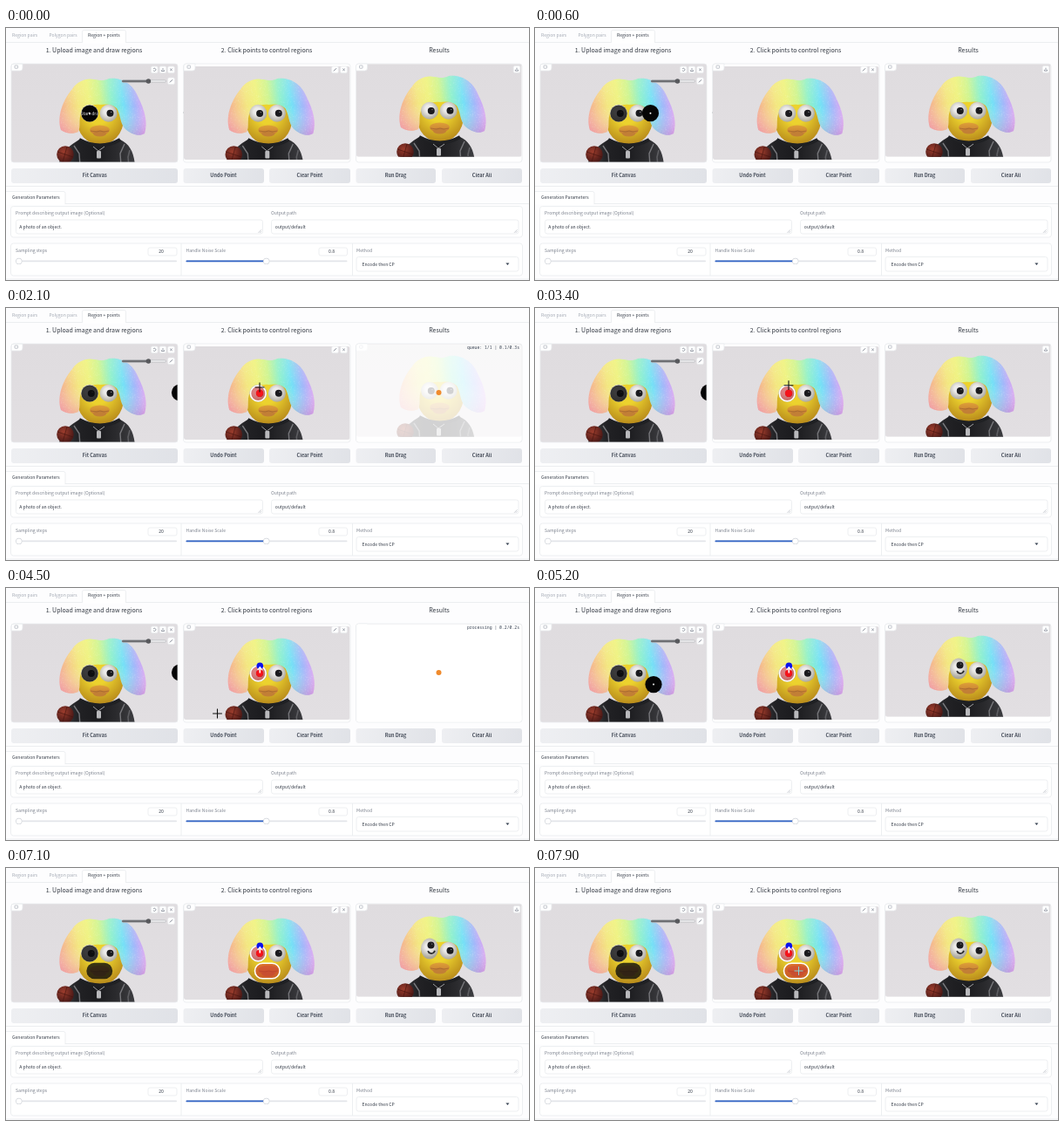
An HTML page with a canvas for the animation above (8 s loop, 600 by 289 pixels).

```html
<!DOCTYPE html>
<html lang="en">
<head>
<meta charset="utf-8">
<title>Region drag demo</title>
<style>
  html, body { margin: 0; width: 100%; height: 100%; overflow: hidden; background: #fdfdfe; }
  canvas, svg { position: absolute; left: 0; top: 0; width: 600px; height: 289px; }
  svg { font: 5.1px "Noto Sans CJK SC", "Noto Sans CJK JP", "Noto Sans", sans-serif; fill: #7b818d; }
  .head { font-size: 7px; fill: #30363f; text-anchor: middle; }
  .btn { font-size: 5.5px; font-weight: 700; fill: #454c59; text-anchor: middle; }
  .val { fill: #333a46; }
  .num { fill: #333a46; text-anchor: middle; }
  .off { fill: #a3a9b4; }
  #status { font: 4.78px "Noto Sans Mono", "Liberation Mono", monospace; fill: #374151; text-anchor: end; }
</style>
</head>
<body>
<canvas id="stage"></canvas>
<svg viewBox="0 0 600 289">
  <g class="off"><text x="7" y="10.4">Region pairs</text><text x="49.5" y="10.4">Polygon pairs</text></g>
  <text class="val" x="94" y="10.4">Region + points</text>
  <g class="head">
    <text x="101" y="28">1. Upload image and draw regions</text>
    <text x="299" y="28">2. Click points to control regions</text>
    <text x="497" y="28">Results</text>
  </g>
  <g class="btn">
    <text x="101.7" y="171">Fit Canvas</text>
    <text x="249.5" y="171">Undo Point</text>
    <text x="348.5" y="171">Clear Point</text>
    <text x="447" y="171">Run Drag</text>
    <text x="546" y="171">Clear All</text>
  </g>
  <text class="val" x="7" y="196.1">Generation Parameters</text>
  <text x="11" y="214.1">Prompt describing output image (Optional)</text>
  <text x="304" y="214.1">Output path</text>
  <text class="val" x="15.3" y="229.9">A photo of an object.</text>
  <text class="val" x="308.8" y="229.9">output/default</text>
  <text x="11" y="257.4">Sampling steps</text>
  <text x="206.5" y="257.4">Handle Noise Scale</text>
  <text x="402" y="257.4">Method</text>
  <text class="num" x="178" y="258.2">20</text>
  <text class="num" x="373.5" y="258.2">0.8</text>
  <text class="val" x="408.5" y="272.6">Encode then CP</text>
  <text id="status" x="589" y="47"></text>
</svg>
<script>
const LOOP = 8000, STEP = 100;
const canvas = document.getElementById('stage');
const statusText = document.getElementById('status');
const c = canvas.getContext('2d');
const dpr = window.devicePixelRatio || 1;
canvas.width = 600 * dpr;
canvas.height = 289 * dpr;

const LINE = '#e9ebee', BRUSH = 9.6;
// Shift of the toy picture in panels two and three
const DX2 = 193.3, DX3 = 390, DY3 = -3;

function box(x, y, w, h, r, fill, stroke) {
  c.beginPath();
  c.roundRect(x, y, w, h, r);
  if (fill) { c.fillStyle = fill; c.fill(); }
  if (stroke) { c.strokeStyle = stroke; c.lineWidth = 0.8; c.stroke(); }
}
function oval(x, y, rx, ry, fill) {
  c.beginPath();
  c.ellipse(x, y, rx, ry, 0, 0, 7);
  c.fillStyle = fill;
  c.fill();
}
const dot = (x, y, r, fill) => oval(x, y, r, r, fill);
function line(color, width, ...p) {
  c.beginPath();
  c.moveTo(p[0], p[1]);
  for (let i = 2; i < p.length; i += 2) c.lineTo(p[i], p[i + 1]);
  c.strokeStyle = color;
  c.lineWidth = width;
  c.stroke();
}
function blend(x0, y0, x1, y1, ...colors) {
  const g = c.createLinearGradient(x0, y0, x1, y1);
  colors.forEach((k, i) => g.addColorStop(i / (colors.length - 1), k));
  return g;
}
function glow(x, y, r, r0, a, b) {
  const g = c.createRadialGradient(x, y, r0, x, y, r);
  g.addColorStop(0, a);
  g.addColorStop(1, b);
  return g;
}
// Eased position along [time, x, y] keys
function follow(t, keys) {
  if (t <= keys[0][0]) return keys[0].slice(1);
  for (let i = 1; i < keys.length; i++) {
    const a = keys[i - 1], b = keys[i];
    if (t < b[0]) {
      let k = (t - a[0]) / (b[0] - a[0]);
      k = k * k * (3 - 2 * k);
      return [a[1] + (b[1] - a[1]) * k, a[2] + (b[2] - a[2]) * k];
    }
  }
  return keys[keys.length - 1].slice(1);
}

const hair = new Path2D('M63 117C58 100 66 82 76 70C82 61 92 57 101 59C108 60 112 61 118 58' +
  'C134 56 147 66 152 80C159 94 163 108 159 121C153 125 143 122 136 115' +
  'C131 109 131 98 127 92C121 87 114 87 108 88C99 87 90 90 86 98C83 106 86 112 83 119C77 122 68 121 63 117Z');
const jacket = new Path2D('M60 158C63 142 74 134 84 128C95 137 120 137 131 128C142 133 147 143 148 158Z');

const curls = new Path2D();
let seed = 7;
const rand = () => (seed = seed * 16807 % 2147483647) / 2147483647;
for (let i = 0; i < 900; i++) {
  const x = 58 + rand() * 104, y = 56 + rand() * 68;
  curls.moveTo(x, y);
  curls.arc(x, y, 0.45, 0, 7);
}

function eye(x, y, ry = 10) {
  oval(x, y, 10, ry, glow(x - 1, y - 2, 12.5, 4, '#ecebea', '#a9a599'));
}
function pupil(x, y) {
  dot(x, y, 4, '#1b1b1e');
  dot(x + 1.2, y - 1.4, 0.7, '#8a8a8e');
}

function toy(edited) {
  c.fillStyle = blend(60, 0, 148, 0, '#47474a', '#222225', '#1b1b1e', '#2a2a2d', '#3d3d41');
  c.fill(jacket);
  line('#77777b', 1.4, 78, 135, 84, 144, 85, 158);
  line('#77777b', 1.4, 136, 133, 131, 144, 132, 158);
  line('#5d5d61', 1.6, 142, 140, 140, 148, 141, 158);
  dot(68, 145, 9.8, glow(66, 142, 12, 1, '#963a2b', '#4d1a17'));
  line('#42130f', 0.6, 59, 142, 77, 148);
  line('#42130f', 0.6, 70, 136, 65, 154);
  oval(108, 104, 27, 30, glow(106, 98, 37, 12, '#ecd22e', '#b5861a'));
  c.beginPath();
  c.moveTo(84, 128);
  c.quadraticCurveTo(108, 141, 131, 128);
  c.strokeStyle = '#1f2023';
  c.lineWidth = 4;
  c.stroke();
  line('#bdbdbf', 0.8, 100, 136, 106, 141, 113, 136);
  box(104, 141, 5, 8.5, 1, '#b9b9bc');

  oval(107.5, 117, 11.5, 5.5, blend(0, 111, 0, 123, '#dfa238', '#c47a33'));
  oval(107.5, 121, 7.5, 3.6, '#c27f36');
  line('#a0622e', 0.7, 97, 118, 104, 119, 108, 118, 112, 119, 118, 118);

  c.fillStyle = blend(61, 108, 161, 92, '#f2a596', '#f5c98a', '#f3e780', '#eef27c', '#cdf48c', '#8cf0cb', '#74e0f6', '#a4b7fa', '#e6a5f0');
  c.fill(hair);
  c.save();
  c.clip(hair);
  c.fillStyle = blend(0, 56, 0, 124, 'rgba(255,250,190,.2)', 'rgba(255,255,255,0)', 'rgba(232,110,180,.4)');
  c.fillRect(56, 54, 110, 74);
  c.fillStyle = 'rgba(255,255,255,.22)';
  c.fill(curls);
  c.restore();

  eye(117.6, 97.8);
  pupil(119.5, 97.8);
  if (edited) {
    eye(96, 95.5, 12);
    pupil(97.5, 91.5);
    c.beginPath();
    c.arc(98, 97, 4, 0.2, 2.9);
    c.strokeStyle = '#2a2a2c';
    c.lineWidth = 1.8;
    c.stroke();
  } else {
    eye(96, 97.8);
    pupil(97.8, 98);
  }
}

function photo(x, y, w, h, dx, dy, edited) {
  c.save();
  c.beginPath();
  c.roundRect(x, y, w, h, 2.5);
  c.clip();
  c.fillStyle = blend(x, y, x, y + h, '#dfdcdf', '#e2dfe2');
  c.fillRect(x, y, w, h);
  c.translate(dx, dy);
  toy(edited);
  c.restore();
}

function badge(x) {
  box(x, 41, 13, 8, [3, 0, 3, 0], '#fff', LINE);
  box(x + 4, 43, 3.6, 3.2, 0.5, null, '#b3b8c1');
}
function tool(x, y, kind) {
  box(x - 3.8, y - 3.8, 7.6, 7.6, 1.5, '#fff', LINE);
  const k = '#717987';
  if (kind === 'x') {
    line(k, 0.7, x - 1.3, y - 1.3, x + 1.3, y + 1.3);
    line(k, 0.7, x + 1.3, y - 1.3, x - 1.3, y + 1.3);
  } else if (kind === 'down') {
    line(k, 0.7, x, y - 1.8, x, y + 0.8);
    line(k, 0.7, x - 1.6, y + 0.4, x - 1.6, y + 1.7, x + 1.6, y + 1.7, x + 1.6, y + 0.4);
  } else if (kind === 'undo') {
    c.beginPath();
    c.arc(x, y, 1.6, -2.4, 2.6);
    c.strokeStyle = k;
    c.lineWidth = 0.7;
    c.stroke();
  } else {
    line(k, 0.9, x - 1.6, y + 1.6, x + 1.6, y - 1.6);
  }
}

function slider(x, w, y, at, full) {
  box(x, y - 0.8, w, 1.6, 0.8, '#e3e5e9');
  if (full) box(x, y - 0.9, at - x, 1.8, 0.9, '#2f62c4');
  dot(at, y, 3.6, '#cfd2d8');
  dot(at, y, 3, '#fff');
}
function grip(x, y) {
  line('#a8aeb8', 0.6, x - 3.5, y, x, y - 3.5);
  line('#a8aeb8', 0.6, x - 1.6, y, x, y - 1.6);
}

function layout() {
  c.fillStyle = '#fdfdfe';
  c.fillRect(0, 0, 600, 289);
  box(-2, 16.5, 603, 165, 2, '#fdfdfe', LINE);
  box(87.5, 2.5, 50, 14, [2, 2, 0, 0], '#fff', LINE);
  line('#fff', 1.2, 88, 16.6, 137, 16.6);
  box(-2, 201.5, 603, 86.5, 2, '#fdfdfe', LINE);
  box(-2, 187.5, 70, 14, [2, 2, 0, 0], '#fff', LINE);
  line('#fff', 1.2, 0, 201.6, 67.5, 201.6);

  for (const [x, w] of [[6, 191], [203.5, 92.5], [302, 93], [401.5, 91.5], [500, 92]])
    box(x, 161, w, 17, 3, blend(x, 161, x + w, 178, '#eeeff2', '#e0e2e7'));

  box(5.5, 204.5, 587, 35.5, 3, '#fff', LINE);
  box(11.5, 220, 283, 16, 2.5, '#fff', LINE);
  box(304.5, 220, 283.5, 16, 2.5, '#fff', LINE);
  grip(293, 234.8);
  grip(586.5, 234.8);

  box(5.5, 247, 587, 37, 3, '#fff', LINE);
  line(LINE, 0.8, 201, 247, 201, 284);
  line(LINE, 0.8, 397.5, 247, 397.5, 284);
  box(163, 252, 33, 9, 2, '#fff', LINE);
  box(359, 252, 32.5, 9, 2, '#fff', LINE);
  slider(11, 185, 267.4, 14.8, false);
  slider(206.5, 185, 267.4, 298.7, true);
  box(402, 262.5, 186, 16.5, 2.5, '#fff', LINE);
  c.beginPath();
  c.moveTo(573.4, 269.6);
  c.lineTo(577.4, 269.6);
  c.lineTo(575.4, 272);
  c.fillStyle = '#374151';
  c.fill();
}

function capsule(x0, x1, y, r) {
  c.beginPath();
  c.roundRect(x0 - r, y - r, x1 - x0 + 2 * r, 2 * r, r);
}

function drawPanel(t) {
  photo(6, 41, 191, 113, 0, 0, false);
  c.save();
  c.beginPath();
  c.roundRect(6, 41, 191, 113, 2.5);
  c.clip();
  c.fillStyle = 'rgba(10,10,12,.78)';
  if (t >= 200) { capsule(96, 96, 98, BRUSH); c.fill(); }
  const [x, y] = follow(t, [[400, 96, 98], [900, 199.5, 97], [4900, 199.5, 97], [5400, 101.5, 118],
    [5800, 101.5, 118], [6200, 109, 118], [6500, 113, 118], [6800, 113, 118], [7100, 212, 116]]);
  if (t >= 5500) { capsule(101.5, t < 6600 ? x : 113, 118, 9.2); c.fill(); }
  dot(x, y, BRUSH, '#050506');
  if (t < 200) {
    c.save();
    c.clip();
    c.font = '5.1px "Noto Sans CJK SC","Noto Sans CJK JP",sans-serif';
    c.textAlign = 'center';
    c.fillStyle = '#e8e8e8';
    c.fillText('Start drawing', 101.5, 99.6);
    c.restore();
  }
  if (x < 190) dot(x, y, 1, '#fff');
  c.restore();

  badge(6);
  tool(170.3, 47.8, 'undo');
  tool(180, 47.8, 'down');
  tool(189.5, 47.8, 'x');
  box(133, 59.8, 50.5, 2.4, 1.2, '#f2f2f3', '#bcbdc1');
  box(133, 59.8, 30, 2.4, 1.2, '#6e6f73');
  dot(163.4, 61, 2.8, '#58595d');
  tool(189.5, 60.8, 'pen');
  box(6, 41, 191, 113, 3, null, LINE);
}

function region(x0, x1, y) {
  capsule(x0, x1, y, 8.8);
  c.fillStyle = 'rgba(205,40,45,.55)';
  c.fill();
  c.strokeStyle = '#fff';
  c.lineWidth = 1.6;
  c.stroke();
}
function cross(x, y, color, r, w) {
  line(color, w, x - r, y, x + r, y);
  line(color, w, x, y - r, x, y + r);
}

function pointPanel(t) {
  box(203.5, 41, 191.5, 113, 3, '#fff', LINE);
  photo(204, 44, 190.5, 107, DX2, 0, false);
  if (t >= 700) region(96 + DX2, 96 + DX2, 98);
  if (t >= 6800) region(101 + DX2, 112 + DX2, 118);
  if (t >= 1900) dot(291, 97.8, 4.2, '#f5141c');
  if (t >= 4000) {
    dot(291.3, 89.3, 3.8, '#0a12ee');
    line('#fff', 1.6, 291.3, 97.5, 291.3, 91.5);
    line('#fff', 1.3, 288.6, 94.2, 291.3, 90.8, 294, 94.2);
  }
  badge(204);
  tool(377.5, 47.8, 'pen');
  tool(387.5, 47.8, 'x');

  c.save();
  c.beginPath();
  c.rect(203.5, 41, 191.5, 113);
  c.clip();
  const [x, y] = follow(t, [[900, 198, 97], [1200, 290.3, 98], [1600, 291, 97.5], [1900, 291, 97.5],
    [2100, 291, 91], [2800, 291, 88.7], [4100, 291, 88.7], [4500, 242.5, 144], [4800, 196, 146],
    [7100, 196, 116], [7600, 302.5, 118]]);
  if (t >= 7100 && x > 284) cross(x, y, '#7fe0e6', 5, 0.9);
  else if (t >= 1100 && t < 1900) cross(x, y, '#fff', 5, 0.9);
  else cross(x, y, '#111', 5.4, 1.1);
  c.restore();
}

const runs = [
  { start: 2000, end: 2600, total: '0.3' },
  { start: 4300, end: 4900, total: '0.2' }
];

function resultPanel(t) {
  box(401.5, 41, 190.5, 113, 3, '#fff', LINE);
  photo(402, 41.2, 189.6, 106.6, DX3, DY3, t >= 4900);
  badge(401.5);
  const run = runs.find(r => t >= r.start && t < r.end);
  let label = '';
  if (run) {
    const age = t - run.start;
    c.globalAlpha = Math.min(1, 0.6 + age * 0.002);
    box(402, 41.5, 189.5, 112, 3, '#fff');
    c.globalAlpha = 1;
    dot(496.5, 97, 3, '#f08a2c');
    label = (age < 200 ? 'queue: 1/1' : 'processing') + ' | ' + (age / 1000).toFixed(1) + '/' + run.total + 's';
  } else {
    tool(586, 47.4, 'down');
  }
  if (statusText.textContent !== label) statusText.textContent = label;
}

function frame() {
  const t = Math.floor(performance.now() % LOOP / STEP) * STEP;
  c.setTransform(dpr, 0, 0, dpr, 0, 0);
  layout();
  drawPanel(t);
  pointPanel(t);
  resultPanel(t);
  requestAnimationFrame(frame);
}
frame();
</script>
</body>
</html>
```
